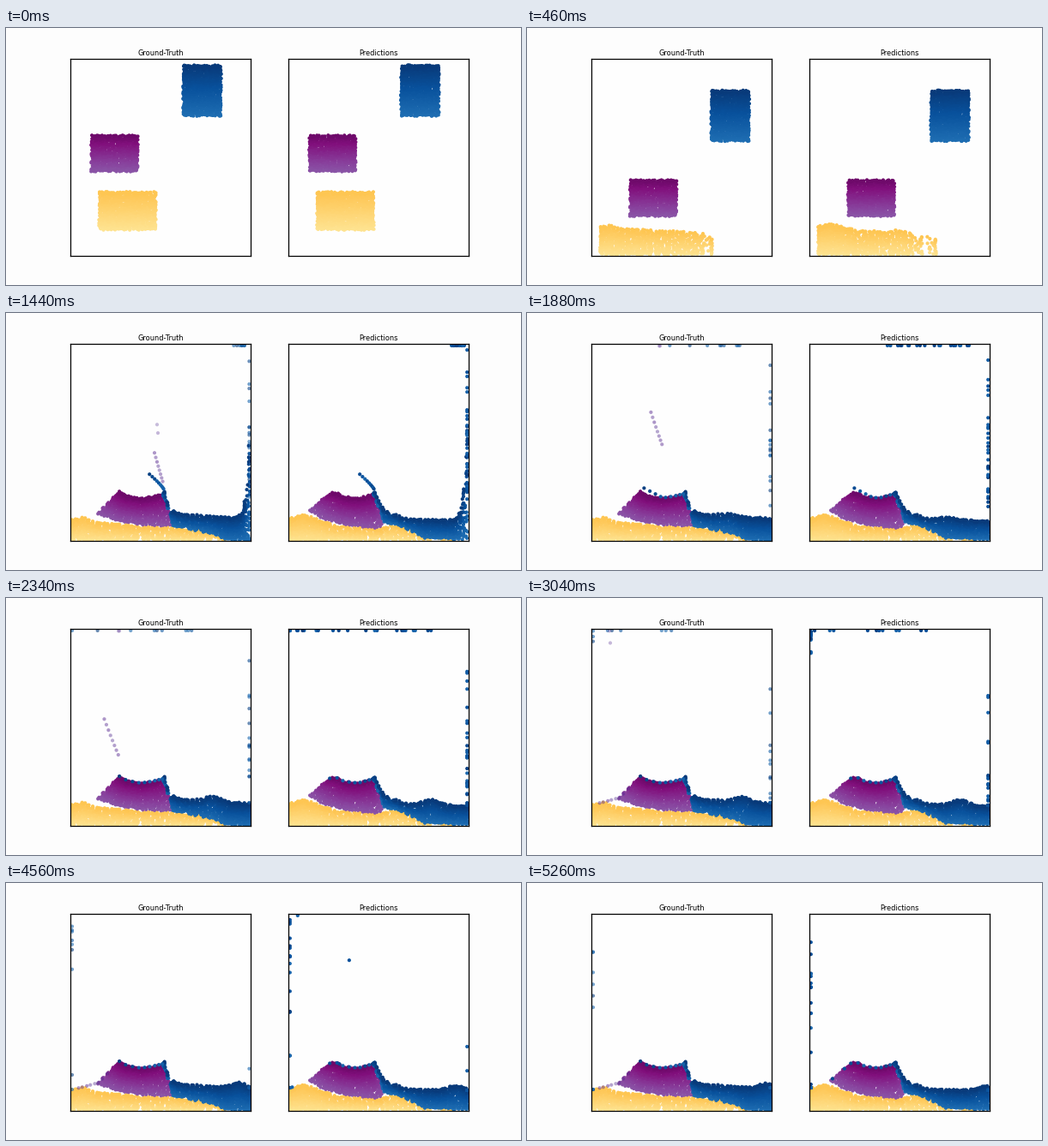
Animation, 600 px wide and 300 px high, one loop 5.28 s. Source, as a matplotlib script:

```python
import numpy as np
import matplotlib.pyplot as plt
from matplotlib.animation import FuncAnimation

FRAMES, STEP = 264, 20
W, H = 600, 300
G = 0.0725                    # half of gravity, px per frame^2
TOP, BOTTOM, WIDTH = 36.4, 266.4, 210.4
SHIFT = 253.8                 # distance between the two panels
rng = np.random.default_rng(4)


def line(points):
    """Piecewise linear height y(x)."""
    xs, ys = np.transpose(points)
    return lambda x: np.interp(x, xs, ys)


def along(points, u):
    """Point on a polyline at fraction u, mostly spaced by x."""
    p = np.array(points, float)
    d = np.abs(np.diff(p, axis=0)) @ [1, 0.25]
    s = np.r_[0, np.cumsum(d)] / d.sum()
    return np.c_[np.interp(u, s, p[:, 0]), np.interp(u, s, p[:, 1])]


def quad(top, low):
    """Shape that keeps the four sides of the block."""
    def shape(u, v, f):
        a = along(low, u)
        return a + (along(top, u) - a) * v[:, None]
    return shape


def pile(surface, floor, wave=lambda x, f: 0):
    """Evenly filled area between two height lines, with a moving surface."""
    top, low = line(surface), line(floor)
    xs = np.linspace(surface[0][0], surface[-1][0], 200)
    fill = np.cumsum(np.maximum(low(xs) - top(xs), 1))

    def shape(u, v, f):
        x = np.interp(u, fill / fill[-1], xs)
        return np.c_[x, low(x) + (top(x) - wave(x, f) - low(x)) * v]
    return shape


def slosh(right, climb):
    """Splash up the right wall, then a low hump drifting to the right."""
    def wave(x, f):
        rise = climb * np.sin(np.pi * np.clip((f - 54) / 40, 0, 1))
        hump = 6 * np.clip((f - 80) / 30, 0, 1)
        center = right - 44 + 0.27 * (f - 110)
        return rise * np.exp((x - right) / 3.5) + hump * np.exp(-((x - center) / 13) ** 2)
    return wave


class Body:
    """Block of particles that falls rigidly, then spreads into a shape."""

    def __init__(self, box, vel, hit, spread, shape, cmap, lo, hi, spacing=2.0):
        x0, y0, x1, y1 = box
        nx, ny = int((x1 - x0) / spacing) + 1, int((y1 - y0) / spacing) + 1
        i, j = (k.ravel() for k in np.meshgrid(np.arange(nx), np.arange(ny)))
        u = np.clip((i + rng.uniform(-0.4, 0.4, i.size)) / (nx - 1), 0, 1)
        v = np.clip((j + rng.uniform(-0.4, 0.4, j.size)) / (ny - 1), 0, 1)
        self.u, self.v, self.vel, self.shape = u, v, np.array(vel), shape
        self.hit, self.spread = hit, spread
        self.start = np.c_[x0 + u * (x1 - x0), y1 + v * (y0 - y1)]
        self.rough = rng.uniform(-0.8, 0.8, (u.size, 2))
        self.colors = plt.get_cmap(cmap)(lo + (hi - lo) * v)

    def at(self, f):
        t = min(f, self.hit)
        p = self.start + self.vel * t + [0, G * t * t]
        if f > self.hit:
            ease = 1 - (1 - min((f - self.hit) / self.spread, 1)) ** 2
            p = p + (self.shape(self.u, self.v, f) - p) * ease
        return p + self.rough


def tint(n, cmap, alpha):
    c = plt.get_cmap(cmap)(rng.uniform(0.78, 0.95, n))
    c[:, 3] = alpha
    return c


class Creepers:
    """Drops that shoot up the right wall; the fast ones cross the ceiling."""

    def __init__(self, left, sky, climbers, crossers, alpha):
        n = climbers + crossers
        fast = np.arange(n) >= climbers
        self.left, self.right, self.sky = left + 2, left + WIDTH - 2, sky
        self.t0 = rng.uniform(55, 63, n)
        self.peak = np.where(fast, 38, 215 - 175 * rng.random(n) ** 1.6)
        self.speed = np.where(fast, rng.uniform(0.6, 4.6, n), 0)
        cross = (WIDTH - 4) / np.maximum(self.speed, 0.1)
        hang = rng.uniform(70, 170, n)
        self.delay = np.where(fast, np.minimum(cross, hang), 0)
        slide = 0.004 + 0.024 * rng.random(n) ** 1.5
        self.pull = np.where(fast & (hang < cross), G, slide)
        self.colors = tint(n, "Blues", alpha)

    def at(self, f):
        t = max(f - 68, 0)
        x = np.maximum(self.right - self.speed * t, self.left)
        rise = np.clip((68 - f) / (68 - self.t0), 0, 1)
        y = self.peak + (250 - self.peak) * rise ** 2
        y = y + self.pull * np.maximum(t - self.delay, 0) ** 2
        y = np.minimum(y, self.sky(x) - 1)
        return np.where((f >= self.t0)[:, None], np.c_[x, y], -99)


class Jet:
    """Ballistic drops from the edge of the mound that settle where they land."""

    def __init__(self, n, origin, sky, t0, up, drift, cmap="Blues", alpha=1.0):
        s = np.linspace(0, 1, n)
        self.t0, self.up, self.drift = (a + (b - a) * s for a, b in (t0, up, drift))
        self.origin, self.sky = origin, sky
        self.colors = tint(n, cmap, alpha)
        # flight ends on the first contact with the ground on the way down
        t = np.arange(FRAMES)[:, None]
        p = self.fly(t)
        landed = (p[1] > sky(p[0])) & (2 * G * t > self.up)
        self.flight = landed.argmax(axis=0)

    def fly(self, t):
        return self.origin[0] + self.drift * t, self.origin[1] - self.up * t + G * t * t

    def at(self, f):
        x, y = self.fly(np.minimum(f - self.t0, self.flight))
        y = np.clip(y, TOP + 2, self.sky(x) - 1)
        return np.where((f >= self.t0)[:, None], np.c_[x, y], -99)


def make_panel(left, sand_top, goop_top, goop_low, water_top, water_low,
               drift, climb, counts, alpha):
    dx = left - 75
    sand_low = [(left, 265), (left + WIDTH, 265)]
    blocks = [
        Body((109 + dx, 192, 174 + dx, 235), (-0.8, 1.0), 14, 26,
             pile(sand_top, sand_low), "YlOrBr", 0.25, 0.37),
        Body((100 + dx, 126, 153 + dx, 167), (0.9, 0.6), 27, 15,
             quad(goop_top, goop_low), "BuPu", 0.69, 0.92),
        Body((207 + dx, 44, 250 + dx, 102), (drift, -0.39), 49, 14,
             pile(water_top, water_low, slosh(left + WIDTH - 2, climb)),
             "Blues", 0.76, 0.96)]
    sky = line(sand_top[:2] + goop_low[:1] + goop_top + water_top)
    edge = water_top[0]
    drops = [Creepers(left, sky, *counts, alpha),
             Jet(9, edge, sky, (60, 68), (2.6, 1.2), (-1.4, -0.1))]
    return blocks, drops, sky


# left panel
blocks, drops, sky = make_panel(
    75,
    sand_top=[(77, 242), (90, 239), (104, 244), (150, 249), (195, 250),
              (235, 255), (254, 264)],
    goop_top=[(132, 209), (141, 214), (157, 217), (170, 215), (183, 212)],
    goop_low=[(108, 234), (128, 242), (160, 247), (194, 248)],
    water_top=[(184, 209), (191, 230), (205, 235), (283.5, 240)],
    water_low=[(184, 214), (194, 248), (240, 257), (256, 264), (284, 265)],
    drift=0.36, climb=85, counts=(16, 9), alpha=0.6)
drops += [Jet(8, (186, 208), sky, (62, 69), (5.2, 4.0), (-1.3, -1.15), "Purples", 0.45),
          Jet(2, (186, 208), sky, (62, 63), (8.5, 8.2), (-1.0, -1.0), "Purples", 0.35)]
left_panel = blocks, drops

# right panel
right_panel = make_panel(
    75 + SHIFT,
    sand_top=[(331, 240), (345, 236), (360, 240), (385, 249), (438, 252), (449, 247),
              (465, 251), (485, 261), (520, 264)],
    goop_top=[(379, 210), (386, 211), (394, 215), (410, 217), (428, 212)],
    goop_low=[(354, 231), (370, 240), (390, 246), (433, 251), (441, 244)],
    water_top=[(429, 209), (434, 219), (441, 230), (463, 240), (537, 243)],
    water_low=[(429, 213), (441, 245), (452, 246), (470, 253), (488, 262), (538, 264)],
    drift=0.45, climb=125, counts=(32, 24), alpha=1.0)[:2]

fig = plt.figure(figsize=(12, 6), dpi=50, facecolor="#fdfdfd")
panels = []
for title, x0, (blocks, drops) in (("Ground-Truth", 75, left_panel),
                                   ("Predictions", 75 + SHIFT, right_panel)):
    ax = fig.add_axes((x0 / W, 1 - BOTTOM / H, WIDTH / W, (BOTTOM - TOP) / H))
    # data units are stage pixels
    ax.set(xlim=(x0, x0 + WIDTH), ylim=(BOTTOM, TOP), xticks=[], yticks=[],
           facecolor="#fefefe")
    ax.set_title(title, fontsize=11.9, fontfamily="DejaVu Sans")
    for spine in ax.spines.values():
        spine.set_linewidth(1.8)
    colors = np.vstack([p.colors for p in blocks + drops])
    dots = ax.scatter(*np.zeros((2, len(colors))), s=36, c=colors, linewidths=0)
    bounds = (x0 + 1.5, TOP + 1.6), (x0 + WIDTH - 1.5, BOTTOM - 1.4)
    panels.append((dots, blocks, drops, bounds))


def update(f):
    for dots, blocks, drops, bounds in panels:
        solid = [np.clip(b.at(f), *bounds) for b in blocks]
        dots.set_offsets(np.vstack(solid + [d.at(f) for d in drops]))
    return [p[0] for p in panels]


anim = FuncAnimation(fig, update, frames=FRAMES, interval=STEP, repeat=True,
                     repeat_delay=0, blit=False)
plt.show()
```
